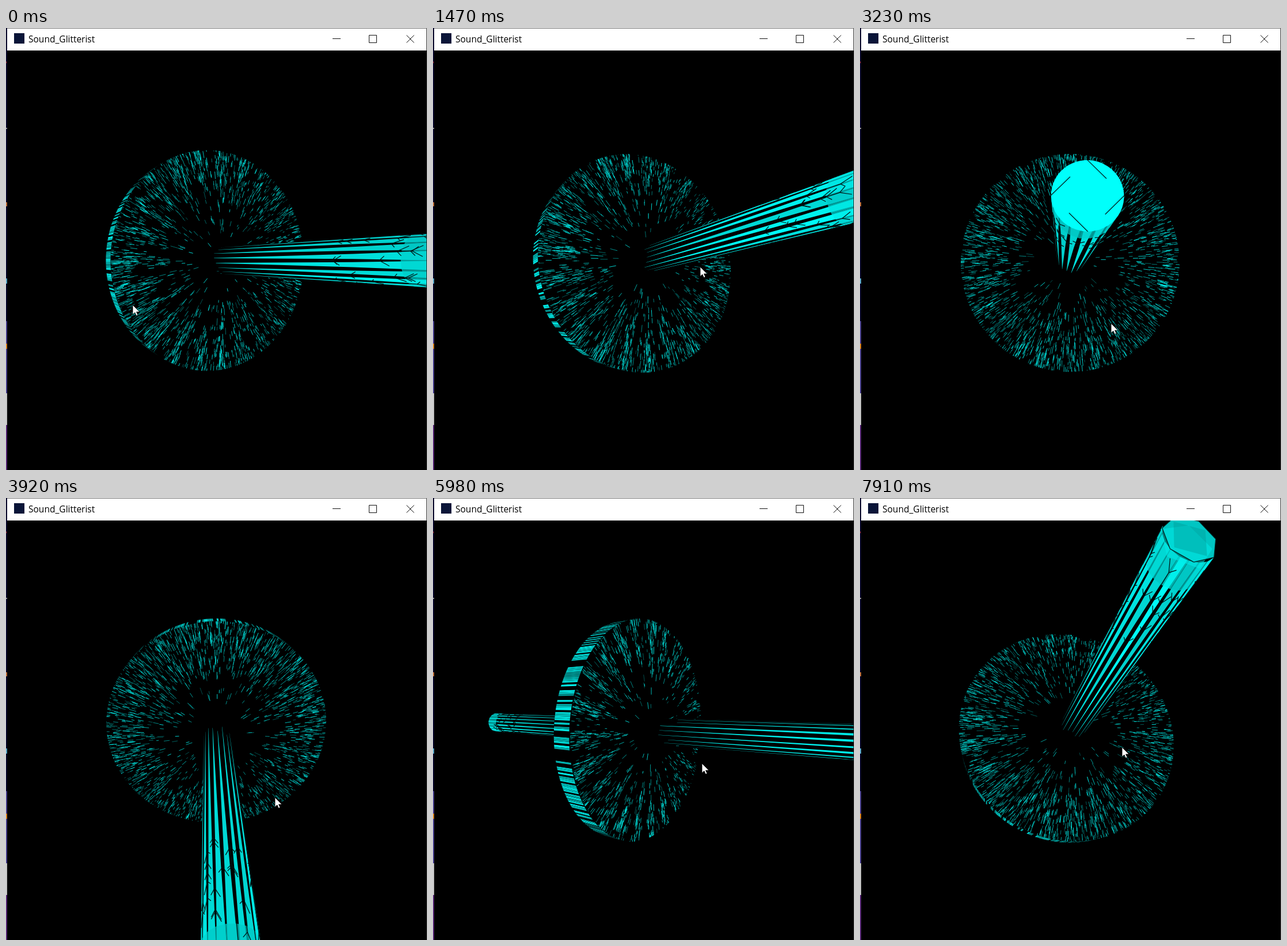
An HTML page with a canvas for the animation above (8000 ms loop, 731x766 px).

```html
<!DOCTYPE html>
<html lang="en">
<head>
<meta charset="utf-8">
<title>Sound_Glitterist</title>
<style>
  html, body { margin: 0; width: 100%; height: 100%; overflow: hidden; background: #000; }
  #stage { position: absolute; left: 0; top: 0; width: 731px; height: 766px; overflow: hidden; }
  canvas, svg { position: absolute; left: 0; top: 0; }
  #title { position: absolute; left: 39px; top: 9px; font: 15.5px/21px "Open Sans", "Noto Sans", sans-serif; color: #000; white-space: nowrap; }
</style>
</head>
<body>
<div id="stage">
  <canvas id="view" width="731" height="766"></canvas>
  <svg width="731" height="766">
    <rect width="731" height="39" fill="#fff"/>
    <rect width="731" height="1" fill="#777"/>
    <rect width="2" height="508" fill="#0b0a2c"/>
    <rect y="508" width="2" height="125" fill="#4b4290"/>
    <rect y="547" width="2" height="9" fill="#d9821c"/>
    <rect y="633" width="2" height="55" fill="#c4c4c4"/>
    <rect y="688" width="2" height="78" fill="#5a2a78"/>
    <rect y="58" width="1" height="3" fill="#b03030"/>
    <rect y="173" width="2" height="2" fill="#999"/>
    <rect y="302" width="2" height="7" fill="#c07038"/>
    <rect y="434" width="2" height="9" fill="#58a8c8"/>
    <rect x="730" y="1" width="1" height="765" fill="#333"/>
    <rect x="14" y="9" width="18" height="18" fill="#0a1538"/>
    <path d="M567 18.5h14M630.5 12.5h13v13h-13zM695.5 12.5l13 13M708.5 12.5l-13 13" fill="none" stroke="#111"/>
    <path id="cursor" d="M0 0V16.5L3.8 13L6.4 18.6L9 17.4L6.5 12H12Z" fill="#fff" stroke="#000" stroke-width=".8"/>
  </svg>
  <div id="title">Sound_Glitterist</div>
</div>
<script>
const ctx = document.getElementById('view').getContext('2d');
const cursor = document.getElementById('cursor');
const LOOP = 8000, CX = 366, CY = 403, CAM = 630, R = 185, H = 16, TAU = Math.PI * 2;

// time, axis x, axis y, rod length, rod radius, pointer x, pointer y
const poses = [
  [0, .49, 0, 385, 23, 220, 480],
  [450, .42, .36, 370, 22, 380, 500],
  [900, .255, .36, 358, 22, 480, 485],
  [1400, .5, -.08, 380, 22, 470, 420],
  [1780, .25, -.6, 410, 22, 430, 380],
  [2140, -.38, -.9, 437, 22, 403, 363],
  [2700, -.18, -.55, 420, 23, 415, 440],
  [3230, .027, -.104, 400, 23.4, 436, 512],
  [4400, 0, .74, 437, 22, 490, 525],
  [4750, 0, .69, 437, 22, 487, 517],
  [5450, .97, .12, 437, 22, 475, 480],
  [5980, .81, .045, 445, 22, 467, 460],
  [6350, .5, -.3, 420, 22, 462, 448],
  [6800, .15, -.45, 405, 22, 458, 436],
  [7910, .215, -.345, 402, 22, 455, 432]
];

// start time and number of even steps until the next start
const spans = [[0, 1], [150, 5], [900, 2], [1190, 1], [1320, 6], [2140, 1], [2290, 1], [2420, 6],
  [3230, 1], [3350, 1], [3480, 7], [4440, 1], [4590, 1], [4750, 6], [5560, 1], [5710, 2],
  [5980, 5], [6670, 1], [6790, 7], [7790, 1], [7910, 1]];
const starts = spans.flatMap(([t, n], i) => {
  const end = i + 1 < spans.length ? spans[i + 1][0] : LOOP;
  return Array.from({ length: n }, (_, k) => t + (end - t) * k / n);
});

const clamp = (v, lo, hi) => Math.min(hi, Math.max(lo, v));
const mix = (a, b, u) => a + (b - a) * u;

function random(seed) {
  let s = seed * 7919 + 17;
  return () => {
    s = s + 0x6D2B79F5 | 0;
    let v = Math.imul(s ^ s >>> 15, 1 | s);
    v = v + Math.imul(v ^ v >>> 7, 61 | v) ^ v;
    return ((v ^ v >>> 14) >>> 0) / 4294967296;
  };
}

function poseAt(t) {
  let i = 0;
  while (i < poses.length - 2 && poses[i + 1][0] <= t) i++;
  const a = poses[i], b = poses[i + 1];
  const before = poses[Math.max(0, i - 1)], after = poses[Math.min(poses.length - 1, i + 2)];
  const span = b[0] - a[0], u = clamp((t - a[0]) / span, 0, 1);
  return a.map((v, k) => {
    if (k > 2) return mix(v, b[k], u);
    const m0 = (b[k] - before[k]) / (b[0] - before[0] || 1) * span;
    const m1 = (after[k] - v) / (after[0] - a[0] || 1) * span;
    const u2 = u * u, u3 = u2 * u;
    return (2 * u3 - 3 * u2 + 1) * v + (u3 - 2 * u2 + u) * m0 + (3 * u2 - 2 * u3) * b[k] + (u3 - u2) * m1;
  });
}

const zoom = z => CAM / (CAM - z);
const project = ([x, y, z]) => [CX + x * zoom(z), CY + y * zoom(z)];

function fill(points, color) {
  ctx.beginPath();
  points.forEach(p => ctx.lineTo(p[0], p[1]));
  ctx.closePath();
  ctx.fillStyle = color;
  ctx.fill();
}

function line(p, q) {
  ctx.beginPath();
  ctx.moveTo(p[0], p[1]);
  ctx.lineTo(q[0], q[1]);
  ctx.stroke();
}

const cyan = (g, a = 1) => `rgba(0,${Math.round(g)},${Math.round(g * .985)},${a})`;

function makeFrame(nx, ny) {
  const len = Math.hypot(nx, ny), k = len > .985 ? .985 / len : 1;
  const n = [nx * k, ny * k, 0];
  n[2] = Math.sqrt(1 - n[0] ** 2 - n[1] ** 2);
  const w = Math.sqrt(1 - n[0] ** 2);
  const e1 = [w, -n[0] * n[1] / w, -n[0] * n[2] / w];
  const e2 = [0, n[2] / w, -n[1] / w];
  const around = a => e1.map((v, i) => v * Math.cos(a) + e2[i] * Math.sin(a));
  const at = (t, r, a) => {
    const q = around(a);
    return n.map((v, i) => v * t + q[i] * r);
  };
  const spot = (t, r, a) => project(at(t, r, a));
  const ring = (t, r, sides, turn = 0) =>
    Array.from({ length: sides }, (_, i) => spot(t, r, turn + i / sides * TAU));
  return { n, around, at, spot, ring };
}

function drawDisc(f, rnd) {
  const nz = f.n[2], N = 420;
  fill(f.ring(-H, R, 90), '#000');
  fill(f.ring(H, R, 90), '#000');

  for (let i = 0; i < N; i++) {
    const a = i / N * TAU, b = (i + 1.03) / N * TAU;
    const on = rnd() < .66, glow = .55 + .45 * rnd();
    const facing = f.around(a)[2] - R / CAM;
    if (facing <= 0) continue;
    const quad = [f.spot(-H, R, a), f.spot(H - 2, R, a), f.spot(H - 2, R, b), f.spot(-H, R, b)];
    fill(quad, '#000');
    if (on) fill(quad, cyan(242, glow * clamp(.45 + facing * 4, 0, 1)));
  }

  const lobes = .35 + .6 * Math.abs(f.n[0]);
  ctx.lineWidth = 1;
  for (let i = 0; i < 9000; i++) {
    const a = rnd() * TAU, d = Math.sqrt(rnd()), pick = rnd(), size = (4 + 9 * rnd()) / R, glow = rnd();
    const wave = (.5 + .5 * Math.cos(24 * a)) ** 1.6;
    const near = clamp(.75 + (zoom(f.at(H, R * d, a)[2]) - 1) * 2, .25, 1.3);
    const dense = clamp((d - .12) / .72, 0, 1) ** 1.7;
    const weight = dense * (1 - lobes + lobes * 1.7 * wave) * near * clamp(nz * 1.25, 0, 1);
    if (pick > weight * .62) continue;
    ctx.strokeStyle = cyan(240, .3 + .6 * glow);
    line(f.spot(H, R * d, a), f.spot(H, R * Math.min(1, d + size), a));
  }
}

function drawRod(f, sign, length, radius, rnd) {
  const nz = f.n[2], K = 18, da = Math.PI / K;
  const end = sign * length;
  const first = Math.max(.08, .67 - 1.6 * (nz - .23));
  const full = clamp(.2 + .72 * nz, .3, .86);
  const side = Math.atan2(f.n[1], f.n[0]) + Math.PI / 2;
  const edge = (t, r, s) => {
    const c = f.n.map(v => v * t), p = project(c), w = s * r * zoom(c[2]);
    return [p[0] + Math.cos(side) * w, p[1] + Math.sin(side) * w];
  };
  fill([edge(sign * H, radius, -1), edge(end, radius, -1), edge(end, radius, 1), edge(sign * H, radius, 1)], '#000');

  for (let k = 0; k < K; k++) {
    const a = (k + .5) / K * TAU, shade = 205 + 45 * rnd(), start = first * (.8 + .9 * rnd()), w = full * (.75 + .4 * rnd());
    if (f.around(a)[2] < radius / CAM) continue;
    const lane = (t, u) => f.spot(end * t, radius, a + da * u);
    fill([lane(start, -.04), lane(.8, -w * .65), lane(1, -w), lane(1, w), lane(.8, w * .65), lane(start, .04)], cyan(shade));
    fill([lane(.93, -1), lane(1, -1), lane(1, 1), lane(.93, 1)], cyan(shade - 15, .75));
  }

  ctx.strokeStyle = '#001010';
  ctx.lineWidth = 1.2;
  for (let i = 0; i < 46; i++) {
    const a = Math.floor(rnd() * K) / K * TAU, t = .7 + .27 * rnd(), bend = rnd() < .5 ? -da : da;
    if (f.around(a)[2] < radius / CAM) continue;
    const joint = f.spot(end * t, radius, a);
    line(f.spot(end * (t - .05), radius, a), joint);
    line(joint, f.spot(end * (t + .025), radius, a + bend * 1.2));
    line(joint, f.spot(end * (t + .012), radius, a - bend));
  }
  if (sign > 0 && CAM * nz > length) drawCap(f, length, radius, rnd);
}

function drawCap(f, length, radius, rnd) {
  const nz = f.n[2], facing = nz > .97, turn = rnd();
  const shade = clamp(165 + (nz - .88) * 950, 140, 255);
  fill(f.ring(length, radius, facing ? 48 : 7, turn), cyan(shade));
  if (!facing) {
    fill(f.ring(length * .985, radius, 5, turn + .5), cyan(235, .55));
    fill(f.ring(length, radius * .82, 4, turn + .2), cyan(150, .4));
  }
  ctx.strokeStyle = '#002422';
  ctx.lineWidth = 1.3;
  const square = f.ring(length, radius, facing ? 4 : 7, facing ? 0 : turn);
  ctx.setLineDash(facing ? [46, 44] : []);
  square.forEach((p, i) => line(p, square[(i + 1) % square.length]));
  ctx.setLineDash([]);
}

function draw(step) {
  const [, nx, ny, length, radius, px, py] = poseAt(starts[step]);
  const f = makeFrame(nx, ny), rnd = random(step + 1);
  ctx.fillStyle = '#000';
  ctx.fillRect(0, 0, 731, 766);
  drawRod(f, -1, length, radius, rnd);
  drawDisc(f, rnd);
  drawRod(f, 1, length, radius, rnd);
  cursor.setAttribute('transform', `translate(${Math.round(px)} ${Math.round(py)})`);
}

let shown = -1;
const origin = performance.now();
function tick() {
  const t = Math.max(0, performance.now() - origin) % LOOP;
  let step = starts.length - 1;
  while (step > 0 && starts[step] > t) step--;
  if (step !== shown) draw(shown = step);
  requestAnimationFrame(tick);
}
tick();
</script>
</body>
</html>
```
